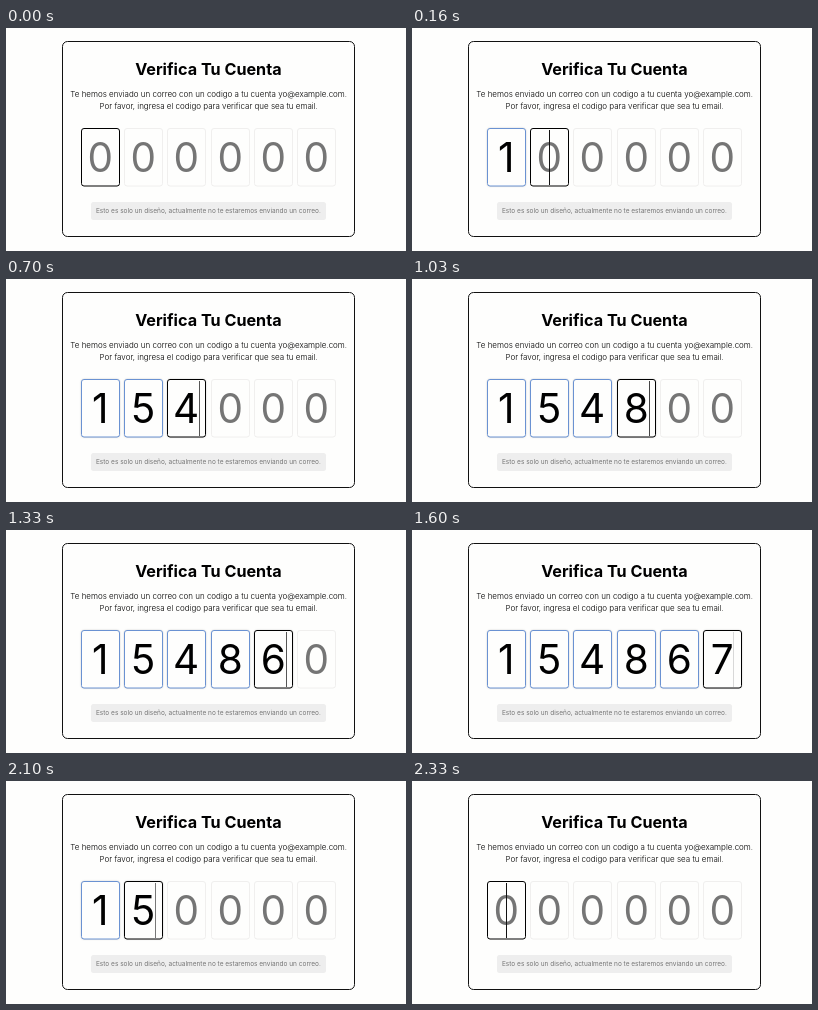
An HTML page with a canvas that plays this animation: 400 px wide and 223 px high, repeating every 2400 ms.

```html
<!DOCTYPE html>
<html lang="es">
<head>
<meta charset="utf-8">
<title>Verifica Tu Cuenta</title>
<style>
  html, body { margin: 0; width: 100%; height: 100%; overflow: hidden; background: #fefefd; }
  canvas { display: block; width: 400px; height: 223px; }
</style>
</head>
<body>
<canvas id="stage"></canvas>
<script>
const W = 400, H = 223, LOOP = 2400;
const CODE = '154867';
const FONT = 'Inter, "Open Sans", sans-serif';
const PAPER = '#fefefd';
const CELL = { x: 75, y: 100.5, w: 38, h: 57.5, step: 43.2 };

// Each step: start time, digits entered, focused cell, caret shade.
const STEPS = [
  [0, 0, 0, null],
  [100, 1, 0, '#555'],
  [160, 1, 1, '#111'],
  [460, 2, 1, '#777'],
  [560, 2, 2, '#111'],
  [700, 3, 2, '#555'],
  [800, 3, 3, '#111'],
  [1030, 4, 3, '#444'],
  [1100, 4, 4, '#111'],
  [1330, 5, 4, '#555'],
  [1400, 5, 5, '#111'],
  [1600, 6, 5, '#d8d8d8'],
  [1660, 5, 5, '#111'],
  [1800, 5, 4, '#555'],
  [1860, 4, 4, '#111'],
  [1900, 4, 3, '#555'],
  [1930, 3, 3, '#111'],
  [1960, 3, 2, '#555'],
  [2100, 2, 1, '#777'],
  [2160, 1, 1, '#111'],
  [2270, 1, 0, '#555'],
  [2330, 0, 0, '#111']
];

const canvas = document.getElementById('stage');
const ctx = canvas.getContext('2d');
const dpr = window.devicePixelRatio || 1;
canvas.width = Math.round(W * dpr);
canvas.height = Math.round(H * dpr);
ctx.scale(dpr, dpr);
ctx.textAlign = 'center';

function box(x, y, w, h, r, fill, stroke) {
  ctx.beginPath();
  ctx.roundRect(x, y, w, h, r);
  ctx.fillStyle = fill;
  ctx.fill();
  if (stroke) {
    ctx.strokeStyle = stroke;
    ctx.lineWidth = 1;
    ctx.stroke();
  }
}

function label(text, x, y, size, weight, color) {
  ctx.font = `${weight} ${size}px ${FONT}`;
  ctx.fillStyle = color;
  ctx.fillText(text, x, y);
}

function drawCard() {
  ctx.fillStyle = PAPER;
  ctx.fillRect(0, 0, W, H);
  box(56.5, 13.5, 292, 195, 5, PAPER, '#111');
  label('Verifica Tu Cuenta', 202.4, 47, 16.2, 700, '#000');
  label('Te hemos enviado un correo con un codigo a tu cuenta yo@example.com.', 202.7, 69, 8, 300, '#000');
  label('Por favor, ingresa el codigo para verificar que sea tu email.', 202.7, 81, 8, 300, '#000');
  box(85, 174, 235, 18, 2.5, '#eee');
  label('Esto es solo un diseño, actualmente no te estaremos enviando un correo.', 202.4, 185.4, 6.5, 400, '#757575');
}

function drawCell(i, filled, focused, caret) {
  const x = Math.round(CELL.x + i * CELL.step) + 0.5;
  const mid = x + CELL.w / 2;
  const border = focused ? '#000' : filled ? '#6a92d2' : '#f0efee';

  if (filled) {
    ctx.save();
    ctx.shadowColor = 'rgba(0, 0, 0, .35)';
    ctx.shadowBlur = 2 * dpr;
    box(x, CELL.y, CELL.w, CELL.h, 2.5, PAPER);
    ctx.restore();
  }
  box(x, CELL.y, CELL.w, CELL.h, 2.5, PAPER, border);

  const digit = filled ? CODE[i] : '0';
  label(digit, mid - 0.3, 143.8, 40.5, 400, filled ? '#000' : '#757575');
  if (focused && caret) {
    const shift = filled ? ctx.measureText(digit).width / 2 : 0;
    ctx.fillStyle = caret;
    ctx.fillRect(Math.floor(mid + shift), 102, 1, 55);
  }
}

function draw(t) {
  const [, count, focus, caret] = STEPS.findLast(s => s[0] <= t);
  drawCard();
  for (let i = 0; i < CODE.length; i++) {
    drawCell(i, i < count, i === focus, caret);
  }
}

const start = performance.now();
function tick() {
  draw((performance.now() - start) % LOOP);
  requestAnimationFrame(tick);
}
tick();
</script>
</body>
</html>
```
